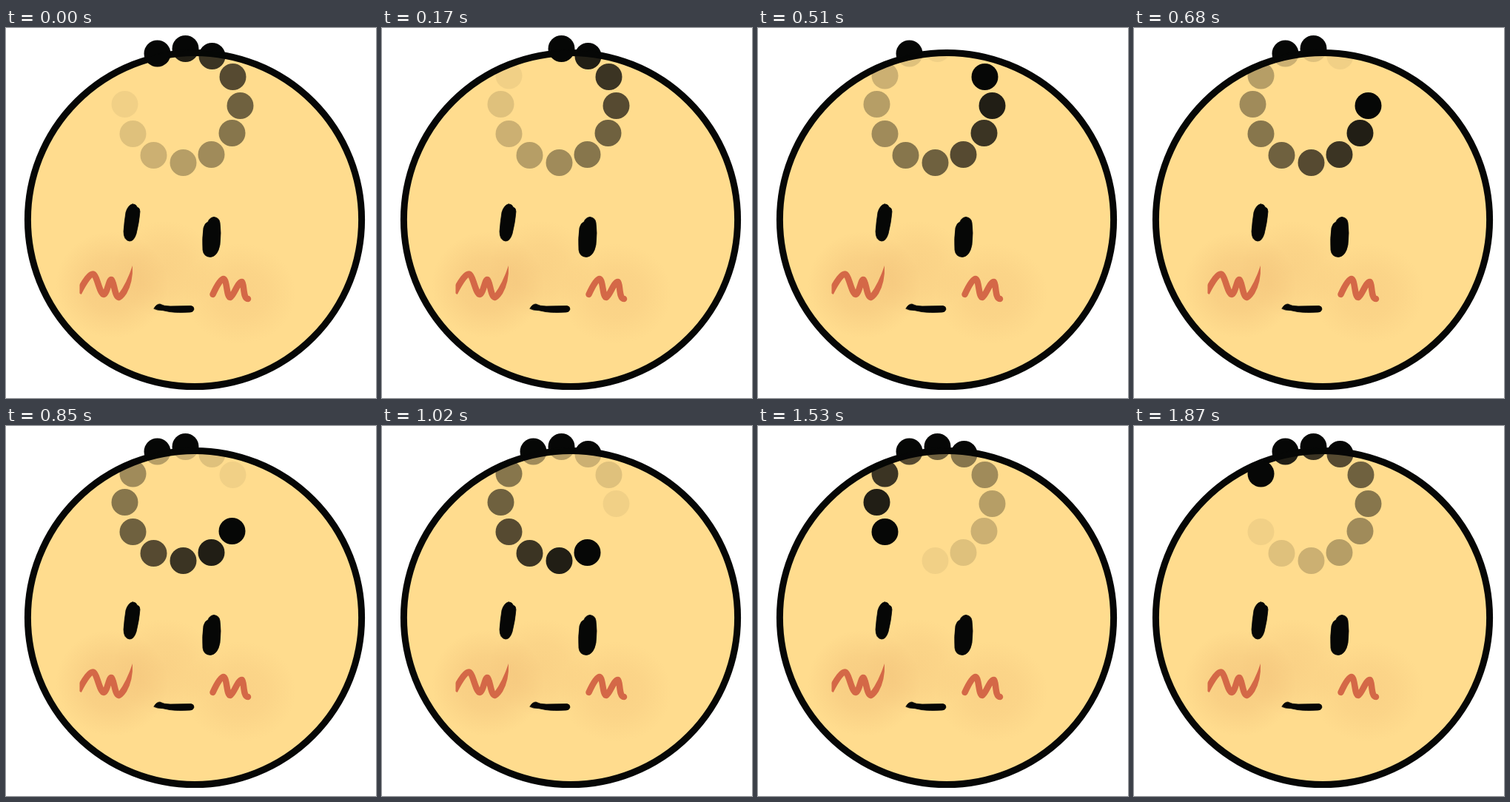
An HTML page with a canvas that plays this animation: 500 by 500 pixels, repeating every 2.04 s.

```html
<!DOCTYPE html>
<html lang="en">
<head>
<meta charset="utf-8">
<title>Thinking face</title>
<style>
html, body { margin: 0; width: 100%; height: 100%; overflow: hidden; background: #fff; }
canvas { display: block; width: 500px; height: 500px; }
</style>
</head>
<body>
<canvas id="stage" width="500" height="500"></canvas>
<script>
const ctx = document.getElementById('stage').getContext('2d');
const STEP = 170, INK = '#060706', RED = '#d46847';
const FACE = { x: 255, y: 259, r: 225.6, line: 9 };
const DOT_R = 18;
// Spinner dots, clockwise from the upper left
const DOTS = [
  [204.5, 34.5], [242.5, 28], [278.5, 38], [306.5, 66], [316.5, 105], [305.5, 142],
  [277.5, 171], [239.5, 182], [199.5, 172], [171.5, 143], [160.5, 103], [171.5, 64.5]
];

const LEFT_EYE = new Path2D('M171 238Q176 238 177 242Q181 243 181 248Q180 262 176 278Q173 288 167 288Q159 287 159 275Q160 261 162 249Q165 239 171 238Z');
const RIGHT_EYE = new Path2D('M281 255.500Q288 256 289 263Q291 276 289 293Q286 309 276 309.500Q267 309 266 300Q265 284 267 270Q269 263 273 262Q275 256 281 255.500Z');
const MOUTH = new Path2D('M200 379Q203 373 208 373Q213 376 222 376L250 375.500Q254 376 254 380Q253 384 249 384Q232 385 221 383.500Q211 381 205 381Z');
const LEFT_MARK = new Path2D('M98 358Q112 331 118 332.500C123 335 127 360 132 360C137 359 139 339 142.500 340C146 342 147 364 152.500 364');
const LEFT_TIP = new Path2D('M152 368.500Q157 368 163 359Q172 343 171 321Q163 345 152 359.500Z');
const RIGHT_MARK = new Path2D('M279.500 360Q289 339 294 339C299 341 298 364 303 364C308 362 313 343 319 343C322 345 320 366 327 366');

function circle(x, y, r) {
  ctx.beginPath();
  ctx.arc(x, y, r, 0, Math.PI * 2);
}

function blush(x, y, rx, ry, alpha) {
  ctx.save();
  ctx.translate(x, y);
  ctx.scale(rx, ry);
  const g = ctx.createRadialGradient(0, 0, 0, 0, 0, 1);
  g.addColorStop(0, `rgba(215,140,80,${alpha})`);
  g.addColorStop(0.5, `rgba(215,140,80,${alpha * 0.7})`);
  g.addColorStop(1, 'rgba(215,140,80,0)');
  ctx.fillStyle = g;
  circle(0, 0, 1);
  ctx.fill();
  ctx.restore();
}

function drawFace() {
  circle(FACE.x, FACE.y, FACE.r);
  ctx.fillStyle = '#ffdc8e';
  ctx.fill();

  blush(143, 347, 76, 72, 0.2);
  blush(215, 326, 70, 66, 0.13);
  blush(316, 359, 76, 68, 0.13);

  ctx.fillStyle = ctx.strokeStyle = INK;
  ctx.lineWidth = 0.8;
  ctx.lineJoin = 'round';
  [LEFT_EYE, RIGHT_EYE, MOUTH].forEach(p => {
    ctx.fill(p);
    ctx.stroke(p);
  });

  ctx.strokeStyle = ctx.fillStyle = RED;
  ctx.lineWidth = 8.5;
  ctx.lineCap = 'round';
  ctx.stroke(RIGHT_MARK);
  ctx.fill(LEFT_TIP);

  // The left mark starts with a straight vertical cut
  ctx.save();
  ctx.beginPath();
  ctx.rect(99.5, 300, 100, 100);
  ctx.clip();
  ctx.lineCap = 'butt';
  ctx.stroke(LEFT_MARK);
  ctx.restore();

  circle(FACE.x, FACE.y, FACE.r);
  ctx.strokeStyle = INK;
  ctx.lineWidth = FACE.line;
  ctx.stroke();
}

function draw(now) {
  const head = Math.floor(now / STEP) % DOTS.length;
  const age = i => (i - head + DOTS.length) % DOTS.length;

  ctx.fillStyle = '#fff';
  ctx.fillRect(0, 0, 500, 500);

  // Beyond the face, dots are either solid or absent
  ctx.fillStyle = INK;
  DOTS.forEach(([x, y], i) => {
    if (i > 2 || age(i) > (i < 2 ? 9 : 8)) return;
    circle(x, y, DOT_R);
    ctx.fill();
  });

  drawFace();

  ctx.save();
  circle(FACE.x, FACE.y, FACE.r + 3);
  ctx.clip();
  ctx.fillStyle = INK;
  DOTS.forEach(([x, y], i) => {
    ctx.globalAlpha = (1 - age(i) / 11) ** 1.22;
    circle(x, y, DOT_R);
    ctx.fill();
  });
  ctx.restore();
}

const start = performance.now();
function tick() {
  draw(performance.now() - start);
  requestAnimationFrame(tick);
}
tick();
</script>
</body>
</html>
```
